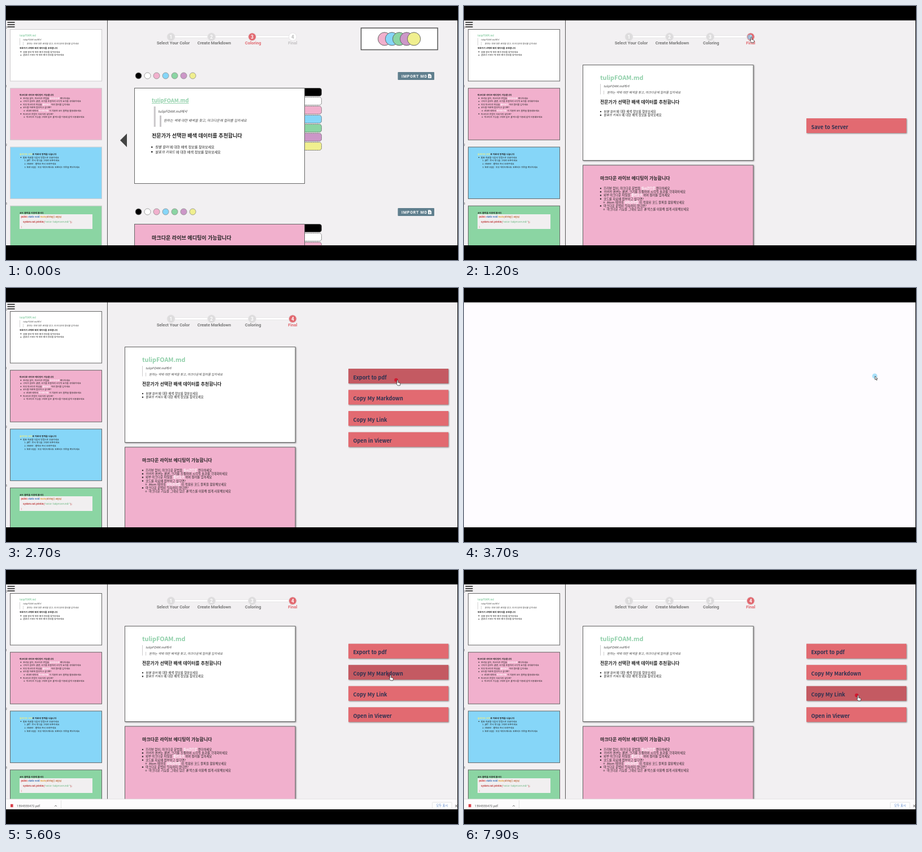
Recreate the animation shown at these times as an HTML page. Size 800 by 450 pixels, loop 8000 ms.

```html
<!DOCTYPE html>
<html lang="ko">
<head>
<meta charset="utf-8">
<style>
html, body { margin: 0; width: 100%; height: 100%; overflow: hidden; background: #000; }
svg { display: block; width: 800px; height: 450px; font-family: "Noto Sans CJK KR", "Noto Sans KR", sans-serif; }
text { white-space: pre; }
.ui { font-family: Roboto, sans-serif; }
.b { font-weight: 700; }
.i { font-style: italic; }
.shadow { filter: drop-shadow(1.5px 1.5px 1.2px rgba(0, 0, 0, .45)); }
</style>
</head>
<body>
<svg id="stage" viewBox="0 0 800 450"></svg>
<script>
const PINK = '#f1b0cd', BLUE = '#86d6f8', GREEN = '#8bd5a3', PURPLE = '#cc97c8', YELLOW = '#f0ef8f';
const SWATCHES = ['#000', '#fff', PINK, BLUE, GREEN, PURPLE, YELLOW];
const PAGE = '#f2f0f2', INK = '#222', RED = '#e26a71', DARK_RED = '#c45a62';
const DOC = 'tulipFOAM.md';

const rect = (x, y, w, h, fill, attrs = '') =>
  `<rect x="${x}" y="${y}" width="${w}" height="${h}" fill="${fill}" ${attrs}/>`;
const circle = (x, y, r, fill, attrs = '') => `<circle cx="${x}" cy="${y}" r="${r}" fill="${fill}" ${attrs}/>`;
const path = (d, fill, attrs = '') => `<path d="${d}" fill="${fill}" ${attrs}/>`;
const group = (id, body) => `<g id="${id}">${body}</g>`;

// *word* is a white highlight, _word_ is italic
const rich = s => s
  .replace(/\*(.+?)\*/g, '<tspan fill="#fff" class="b">$1</tspan>')
  .replace(/_(.+?)_/g, '<tspan class="i">$1</tspan>');
const text = (x, y, size, s, cls = '', fill = INK, attrs = '') =>
  `<text x="${x}" y="${y}" font-size="${size}" class="${cls}" fill="${fill}" ${attrs}>${rich(s)}</text>`;

const card = (x, y, w, h, fill, cls = '') => rect(x, y, w, h, fill, `stroke="#666" class="${cls}"`);

function bullet(x, y, size, s, nested) {
  const dot = nested
    ? circle(x - size * .95, y - size * .36, size * .2, 'none', `stroke="${INK}" stroke-width=".5"`)
    : circle(x - size * .95, y - size * .36, size * .22, INK);
  return dot + text(x, y, size, s);
}

// rows: baselines of title, two quotes, heading, two bullets; bars: x, top, y, height of the two quote bars
function intro(x, rows, { title, head, body, quote, inner, list, bar, bars, link = '' }) {
  const [a, b, c, d, e, f] = rows;
  const [x1, y1, x2, y2, bottom] = bars;
  return text(x, a, title, DOC, 'b', '#8fcfa9', link) +
    rect(x + x1, y1, bar, bottom - y1, '#c9c7c9') +
    rect(x + x2, y2, bar, bottom - y2, '#c9c7c9') +
    text(x + quote, b, body, DOC + '에서', 'i', '#444') +
    text(x + inner, c, body, '원하는 색에 대한 배색을 찾고, 마크다운에 컬러를 입히세요', 'i', '#444') +
    text(x, d, head, '전문가가 선택한 배색 데이터를 추천합니다', 'b') +
    bullet(x + list, e, body, '_팀별 컬러_ 에 대한 배색 정보를 찾아보세요') +
    bullet(x + list, f, body, '_발표의 키워드_ 에 대한 배색 정보를 찾아보세요');
}

const LIVE_HEAD = '마크다운 라이브 에디팅이 가능합니다';
const LIVE = [
  '프리뷰 없이, 마크다운 문법을 *실시간으로* 렌더하세요',
  '_이미지 첨부_는 _물론_, 크기를 조절하여 시각적 효과를 극대화하세요',
  '외부 마크다운 파일을 *불러오기* 하여 컬러를 입히세요',
  '코드를 자료에 첨부하고 싶다면?',
  '>Atom 테마의 *하이라이팅* 이 적용된 코드 블록을 활용해보세요',
  '마크다운 문법이 익숙하지 않다면?',
  '>마크다운 기능을 그대로 담은 _툴_ 박스를 이용해 쉽게 사용해보세요'
];
const live = (x, headY, head, y, step, size) => text(x, headY, head, LIVE_HEAD, 'b') +
  LIVE.map((s, i) => {
    const nested = s[0] === '>';
    return bullet(x + (nested ? 12 : 6), y + i * step, size, nested ? s.slice(1) : s, nested);
  }).join('');

function sidebar() {
  const span = (color, s) => `<tspan fill="${color}">${s}</tspan>`;
  let out = rect(179, 25, 1, 400, '#555');
  for (const y of [29, 33, 37]) out += rect(2.5, y - .8, 13, 1.6, '#222');
  let thumbs = '';
  ['#fff', PINK, BLUE, GREEN].forEach((fill, i) => {
    const y = 41.5 + i * 104.2;
    thumbs += rect(7.5, y, 162, 91.5, fill);
    out += text(-1, y - 2, 5, String(i), 'ui', '#444');
  });
  out += group('thumbs', thumbs);
  out += intro(24, [54.3, 61.3, 67.6, 76, 82.5, 88.4],
    { title: 4.1, head: 3.8, body: 3.8, quote: 6, inner: 12.5, list: 6, bar: .8, bars: [0, 57, 6, 63.5, 69.5] });
  out += live(24, 158.5, 3.9, 164.8, 5.55, 3.8);
  out += text(24, 263.6, 3.9, span('#f3ee7c', '슬라이드 단위') + '로 자료의 영역을 나눕니다', 'b');
  out += bullet(30, 269.6, 3.8, '발표 자료를 다음의 방법으로 추출하세요');
  ['1. pdf : 문서 형식을 그대로 보존하세요', '2. viewer : 웹에서 즉시 보여주세요',
   '3. text copy : 외부 에디터에서도 호환되는 전문을 확인하세요']
    .forEach((s, i) => out += text(32.5, 275.3 + i * 5.6, 3.8, s));
  out += text(24, 367.5, 3.9, '코드 블럭을 사용해 봅시다', 'b');
  out += rect(24, 369, 129, 26, '#f1eff0');
  out += text(26.5, 375.3, 3.9, span('#c33', 'public ') + span('#3468b0', 'static void ') +
    span('#e5a23c', 'main') + span('#c0693a', '(String[] args){'), 'b');
  out += text(30, 384, 3.9, span('#b33', 'System.out.println(') +
    span('#8bc49b', `"Hello! ${DOC}!"`) + span('#b33', ');'), 'b');
  return out + text(26.5, 392.5, 3.9, '}', '', '#c33');
}

function stepper(active) {
  const names = ['Select Your Color', 'Create Markdown', 'Coloring', 'Final'];
  const circles = [292, 363.7, 435.7, 507.4], labels = [296, 368.5, 437.3, 507.4];
  let out = rect(292, 52.3, 215, 4, '#fff', 'stroke="#e3e1e3" stroke-width=".8"');
  names.forEach((name, i) => {
    const on = i === active, later = i > active;
    out += circle(circles[i], 54.6, 6.9, on ? RED : later ? '#fff' : '#dddcdd', 'stroke="#e6e4e6"') +
      text(circles[i], 57.6, 8.3, String(i + 1), 'ui b', later ? '#bbb' : '#fff', 'text-anchor="middle"') +
      text(labels[i], 68.4, 7.5, name, 'ui', on ? RED : later ? '#c4c2c4' : '#777',
        'text-anchor="middle" font-weight="600"');
  });
  return out;
}

function tools(y) {
  let out = SWATCHES.map((c, i) => circle(234.5 + i * 16, y, 5.5, c, 'stroke="#888" stroke-width=".8"')).join('');
  out += rect(693.5, y - 6.5, 64.5, 14, '#607f8e', 'rx="1"');
  out += text(700, y + 3.2, 6.9, 'IMPORT MD', 'ui b', '#fff', 'letter-spacing=".9"');
  out += path(`M747 ${y - 3}h3.8l2.2 2.2v5h-6z`, '#fff') +
    path(`M750 ${y - .8}v3.4m-1.5-1.4l1.5 1.5 1.5-1.5`, 'none', 'stroke="#607f8e" stroke-width=".8"');
  SWATCHES.forEach((c, i) => {
    out += rect(520, y + 22 + i * 16, 38.5, 14, c, 'rx="4" stroke="#666" stroke-width=".9" stroke-dasharray="2 .7"');
  });
  return out;
}

function coloring() {
  let out = stepper(2) + rect(628.5, 39, 135.5, 38.5, '#fff', 'stroke="#555" stroke-width="1.5"');
  SWATCHES.slice(2).forEach((c, i) => out += circle(670 + i * 13, 58.3, 11.6, c, 'stroke="#666"'));
  out += tools(123.5) + card(227.5, 145.5, 301, 169, '#fff') + path('M202 238l12-12v24z', '#444');
  out += intro(258, [171, 188.7, 205, 233.4, 252.2, 260.6],
    { title: 9.25, head: 9.05, body: 6.06, quote: 11, inner: 21, list: 6, bar: 3, bars: [3.7, 178, 14, 194, 214],
      link: 'text-decoration="underline"' });
  return out + tools(364.5) + card(227.5, 386.5, 301, 169, PINK) + text(258, 414.3, 9.05, LIVE_HEAD, 'b');
}

const slides = () => card(210.5, 104.5, 301.5, 169, '#fff', 'shadow') +
  intro(241, [131.3, 144, 155.2, 172.6, 189, 195.4],
    { title: 10.8, head: 7.95, body: 5.36, quote: 6, inner: 12, list: 6, bar: .9, bars: [0, 138, 6, 150, 156.5] }) +
  card(210.5, 282, 301.5, 169, PINK, 'shadow') + live(241, 308.4, 7.95, 325, 6.22, 5.36);

const button = (y, label) => `<g class="btn" data-y="${y}">` +
  rect(606, y, 177, 26, RED, 'class="shadow"') + text(614.5, y + 18.7, 9.1, label, 'b', '#2b3150') + '</g>';
const ACTIONS = ['Export to pdf', 'Copy My Markdown', 'Copy My Link', 'Open in Viewer'];

const downloads = () => rect(0, 406, 799, 18.5, '#fdfcfd') + rect(0, 405.5, 799, .8, '#ddd') +
  rect(0, 406, 97, 18.5, '#e0dfe1', 'id="tab"') +
  rect(8, 414.8, 4.6, 5.4, '#d9404a') + text(19, 420, 5.6, '1594555472.pdf', 'ui', '#555') +
  path('M86 419l2-2 2 2', 'none', 'stroke="#666" stroke-width=".9"') + rect(97, 408, .8, 15, '#ddd') +
  rect(754.5, 411.5, 34.5, 11, '#fff', 'stroke="#ddd" stroke-width=".8" rx="1"') +
  text(771.8, 419, 5.2, '모두 표시', '', '#4a78c0', 'text-anchor="middle"') +
  path('M795 416l4 4m0-4l-4 4', 'none', 'stroke="#555" stroke-width=".9"');

const stage = document.getElementById('stage');
stage.innerHTML = rect(0, 25, 799, 400, PAGE) + group('side', sidebar()) + group('coloring', coloring()) +
  group('final', stepper(3) + group('slides', slides()) + group('save', button(199, 'Save to Server')) +
    group('actions', ACTIONS.map((s, i) => button(143 + i * 37.5, s)).join(''))) +
  group('bar', downloads()) + group('blank', rect(0, 25, 799, 400, '#fefcff')) +
  group('cursor', circle(0, 0, 4.5, BLUE, 'id="halo"') +
    path('M1.5 1a1 1 0 0 1 2 0v3.4l3 .8q1.2.4 1 1.8l-.7 2.8h-4l-2.8-3.6q.1-1 1.5-.1z', '#fff', 'id="hand" stroke="#222" stroke-width=".7"') +
    path('M.5 0v6.4l1.5-1.3 1.2 2.4 1-.5-1.2-2.3h2z', '#fff', 'id="arrow" stroke="#222" stroke-width=".7"')) +
  rect(0, 0, 800, 25.5, '#000') + rect(0, 424, 800, 26, '#000');

const el = Object.fromEntries([...stage.querySelectorAll('[id]')].map(n => [n.id, n]));
const buttons = [...stage.querySelectorAll('.btn')];
const show = (name, on) => el[name].style.display = on ? '' : 'none';
const within = (t, a, b) => t >= a && t < b;

const TRACK = [[400, 506, 55], [1300, 506, 55], [1750, 690, 209], [2250, 690, 209], [2600, 690.5, 163],
  [3300, 690.5, 163], [3600, 727, 156], [3750, 727, 156], [4150, 44, 419], [4400, 44, 419],
  [5200, 678, 186], [7100, 678, 186], [7600, 695, 222], [8000, 695, 222]];
const CLICKS = [[1900, 2100], [2650, 2900], [4150, 4350], [5500, 5800], [7700, 8000]];

function pointer(t) {
  const i = Math.max(1, TRACK.findIndex(k => k[0] > t));
  const [t0, x0, y0] = TRACK[i - 1], [t1, x1, y1] = TRACK[i];
  const u = Math.max(0, (t - t0) / (t1 - t0)), e = u * u * (3 - 2 * u);
  return [x0 + (x1 - x0) * e, y0 + (y1 - y0) * e];
}

function draw(t) {
  const final = t >= 500, four = t >= 2200, blank = within(t, 3500, 3800), bar = t >= 4000;
  show('coloring', !final);
  show('final', final);
  show('save', !four);
  show('actions', four);
  show('blank', blank);
  show('bar', bar);
  el.thumbs.setAttribute('stroke', final ? '#666' : '#cfcdcf');
  el.slides.setAttribute('transform', `translate(0 ${bar ? -5 : 0})`);
  const lift = bar ? -12.3 : 0;
  el.actions.setAttribute('transform', `translate(0 ${lift})`);

  const [x, y] = pointer(t);
  let over = false;
  for (const b of buttons) {
    const top = +b.dataset.y + (b.parentNode === el.actions ? lift : 0);
    const active = final && !blank && (b.parentNode === el.actions) === four;
    const hover = active && within(x, 606, 783) && within(y, top, top + 26);
    b.firstChild.setAttribute('fill', hover ? DARK_RED : RED);
    over = over || hover;
  }
  const onTab = bar && x < 97 && y > 406;
  const clicking = CLICKS.some(c => within(t, ...c));
  const hand = over || onTab || t < 1400;
  show('tab', onTab);
  show('cursor', t >= 400);
  el.cursor.setAttribute('transform', `translate(${x} ${y})`);
  show('hand', hand);
  show('arrow', !hand);
  show('halo', clicking || !over);
  el.halo.setAttribute('r', clicking ? 3.2 : 4.5);
  el.halo.setAttribute('fill', !clicking ? BLUE : within(t, 5500, 5800) ? '#8a3048' : '#d3142c');
  el.halo.setAttribute('opacity', clicking ? .9 : .7);
}

const start = performance.now();
function tick() {
  draw((performance.now() - start) % 8000);
  requestAnimationFrame(tick);
}
tick();
</script>
</body>
</html>
```
